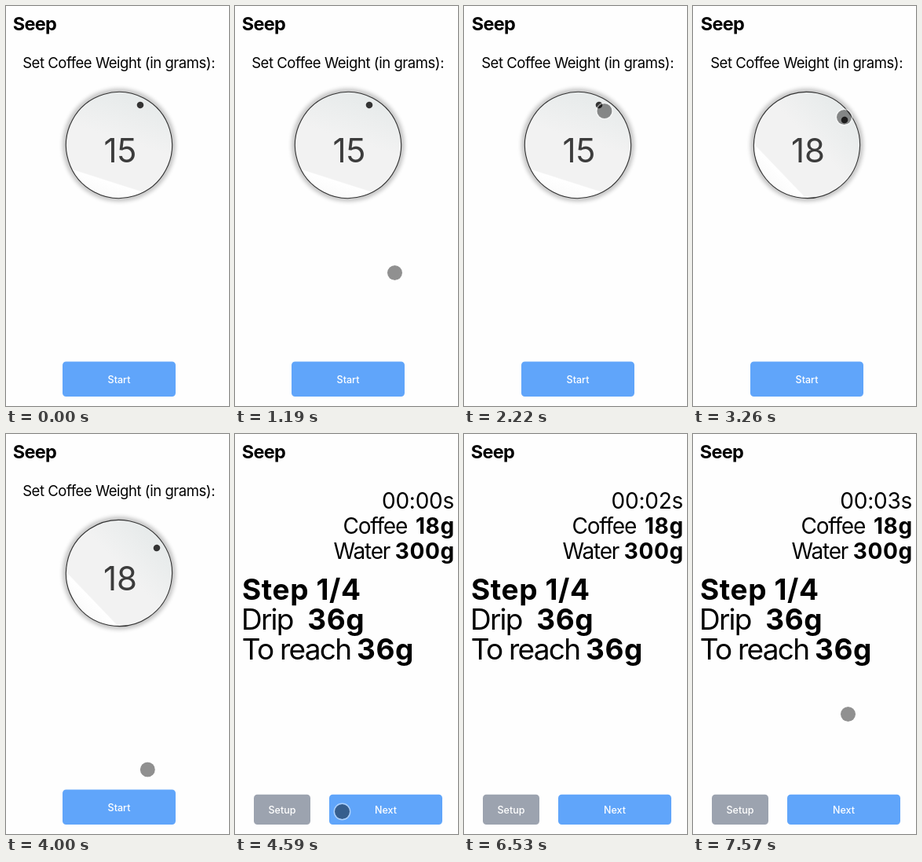
An HTML page for the animation above (8000 ms loop, 284 by 509 pixels).

```html
<!DOCTYPE html>
<html lang="en">
<head>
<meta charset="utf-8">
<title>Coffee timer</title>
<style>
  html, body { margin: 0; width: 100%; height: 100%; overflow: hidden; background: #fefefe; }
  svg { display: block; width: 100%; height: 100%; }
  text { font-family: Inter, Roboto, "Liberation Sans", sans-serif; font-optical-sizing: none; white-space: pre; }
  .title { font-size: 23.5px; font-weight: 700; letter-spacing: -.7px; }
  .heading { font-size: 18.5px; letter-spacing: -.45px; text-anchor: middle; }
  .value { font-size: 42px; fill: #3c3c3c; text-anchor: middle; }
  .label { font-size: 12.5px; font-weight: 500; fill: #fff; text-anchor: middle; }
  .info { font-size: 28px; letter-spacing: -1.2px; }
  .step { font-size: 37px; letter-spacing: -1.75px; }
  .bold { font-weight: 700; letter-spacing: .6px; }
  .time { letter-spacing: -.25px; }
  .end { text-anchor: end; }
</style>
</head>
<body>
<svg viewBox="0 0 284 509">
  <defs>
    <linearGradient id="gloss" gradientUnits="userSpaceOnUse" x1="12" y1="67" x2="-12" y2="-67">
      <stop offset="0" stop-color="#fafafa"/>
      <stop offset=".145" stop-color="#fff"/>
      <stop offset=".155" stop-color="#f2f2f2"/>
      <stop offset=".55" stop-color="#f2f2f2"/>
      <stop offset="1" stop-color="#e6eaea"/>
    </linearGradient>
    <filter id="soft" x="-20%" y="-20%" width="140%" height="140%">
      <feGaussianBlur stdDeviation="2.5"/>
    </filter>
  </defs>

  <g id="stage">
    <text class="title" x="8.8" y="31">Seep</text>

    <g id="setup">
      <text class="heading" x="143.6" y="79">Set Coffee Weight (in grams):</text>
      <g transform="translate(144 177)">
        <circle r="72" opacity=".22" filter="url(#soft)"/>
        <g id="knob">
          <circle id="rim" r="67.5" fill="url(#gloss)" stroke-width="1.1"/>
          <circle cy="-57.7" r="4.3" fill="#333"/>
        </g>
        <text id="value" class="value" x="1.5" y="22"></text>
      </g>
      <rect id="tap" x="64" y="97" width="160" height="160" rx="2" fill="#33b5e5" opacity=".38"/>
      <rect x="72" y="452.5" width="144" height="44.5" rx="4.5" fill="#60a5fa"/>
      <text class="label" x="144" y="479.5">Start</text>
    </g>

    <g id="brew">
      <text id="clock" class="info time end" x="279" y="95"></text>
      <text class="info" x="137.5" y="127">Coffee</text>
      <text class="info bold end" x="279.7" y="127">18g</text>
      <text class="info" x="125.5" y="159">Water</text>
      <text class="info bold end" x="279.7" y="159">300g</text>
      <text class="step bold" x="9" y="210.5">Step 1/4</text>
      <text class="step" x="8" y="248.7">Drip</text>
      <text class="step bold" x="92.2" y="248.7">36g</text>
      <text class="step" x="8.7" y="287">To reach</text>
      <text class="step bold" x="155" y="287">36g</text>
      <rect x="24" y="458.7" width="72" height="38.3" rx="4.5" fill="#9ca3af"/>
      <text class="label" x="60" y="483">Setup</text>
      <rect x="120" y="458.7" width="144" height="38.3" rx="4.5" fill="#60a5fa"/>
      <text class="label" x="192" y="483">Next</text>
    </g>
  </g>

  <g id="pointer">
    <circle r="9.6" opacity=".43"/>
    <circle r="10.2" fill="none" stroke="#fff" stroke-width="1.5" opacity=".48"/>
  </g>
</svg>
<script>
  const LOOP = 8000;
  const FRAME = 148; // the screen refreshes in steps of this length
  const DRAG = { start: 2220, end: 2960, release: 3400 };
  const TAP = 1924, SWITCH = 4588, CLOCK = 4500;
  const $ = id => document.getElementById(id);

  // Pointer strokes as key points: time, x, y.
  const strokes = [
    [
      [740, 236, 415], [1184, 203.5, 339.5], [TAP, 173.5, 130.5],
      [DRAG.end, 192.5, 141.5], [3256, 192.5, 141.5],
      [3700, 268, 320], [4144, 136.5, 480.5], [4883, 136.5, 480.5]
    ],
    [[6956, 79, 413], [7548, 197.5, 356.5], [LOOP, 197.5, 356.5]]
  ];

  const clamp = p => Math.min(1, Math.max(0, p));
  const within = (t, from, to) => t >= from && t < to;
  const show = (id, on) => $(id).style.display = on ? "" : "none";
  const move = (id, x, y) => $(id).setAttribute("transform", `translate(${x} ${y})`);

  function pointerAt(t) {
    const keys = strokes.find(s => within(t, s[0][0], s.at(-1)[0]));
    if (!keys) return null;
    const i = keys.findLastIndex(k => k[0] <= t);
    const [t0, x0, y0] = keys[i], [t1, x1, y1] = keys[i + 1];
    const p = (t - t0) / (t1 - t0);
    return [x0 + (x1 - x0) * p, y0 + (y1 - y0) * p];
  }

  function draw(t) {
    const brewing = t >= SWITCH;
    show("setup", !brewing);
    show("brew", brewing);

    const turned = Math.round(3 * clamp((t - DRAG.start) / (DRAG.end - DRAG.start)));
    $("value").textContent = 15 + turned;
    $("knob").setAttribute("transform", `rotate(${27.9 + turned * 360 / 38})`);

    const tapped = within(t, TAP, TAP + FRAME);
    show("tap", tapped);
    $("rim").setAttribute("stroke", tapped ? "#f33" : "#333");
    move("stage", within(t, TAP + FRAME, DRAG.release) ? 1 : 0, 0);

    const seconds = Math.max(0, Math.floor((t - CLOCK) / 1000));
    $("clock").textContent = `00:${String(seconds).padStart(2, "0")}s`;

    const spot = pointerAt(t);
    show("pointer", spot);
    if (spot) move("pointer", ...spot);
  }

  const start = performance.now();
  function tick() {
    const t = (performance.now() - start) % LOOP;
    draw(Math.floor(t / FRAME) * FRAME);
    requestAnimationFrame(tick);
  }
  tick();
</script>
</body>
</html>
```
